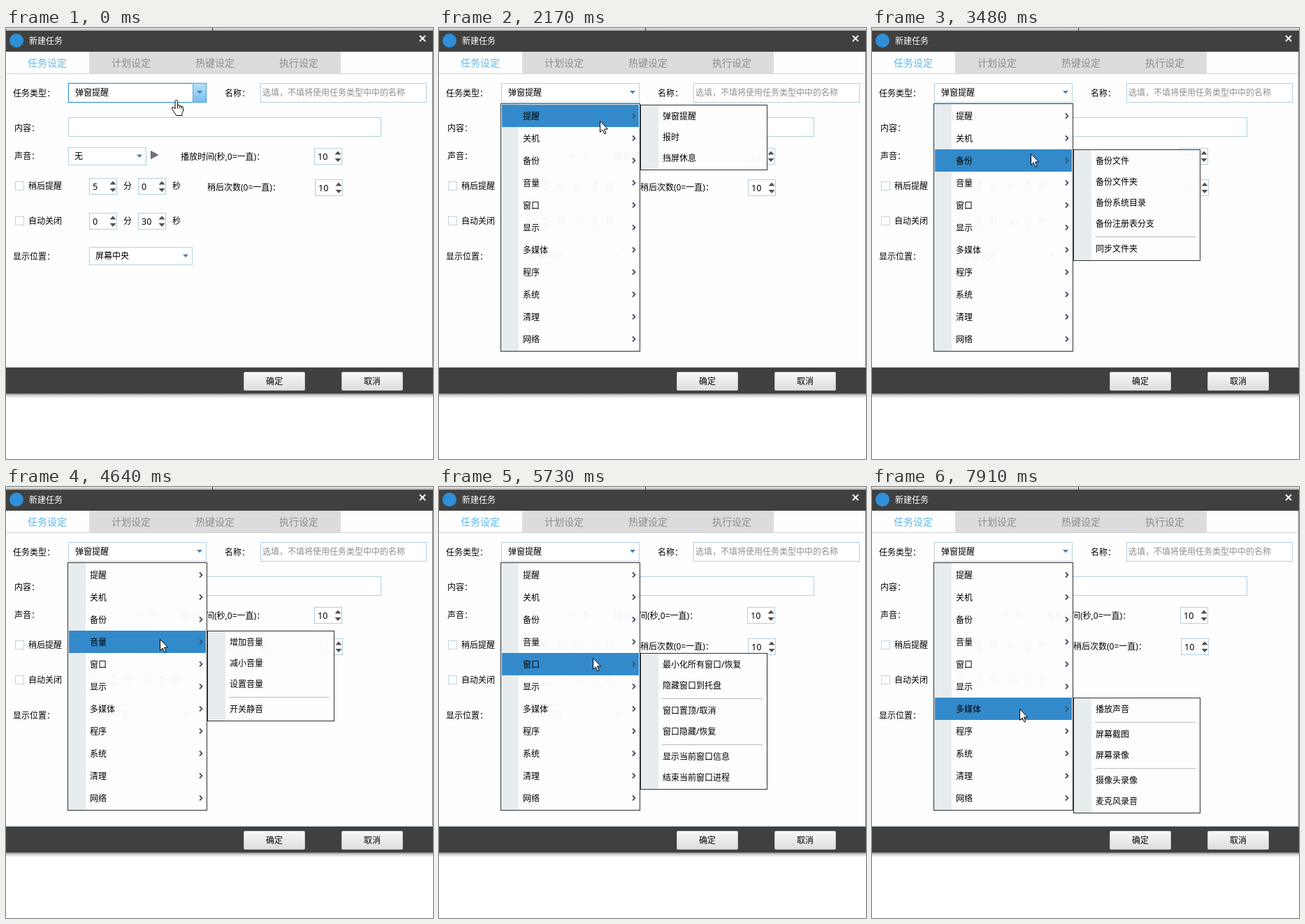
Animation, 611 px wide and 618 px high, one loop 8000 ms. Source, as an HTML page:

```html
<!DOCTYPE html>
<html lang="zh-CN">
<head>
<meta charset="utf-8">
<title>新建任务</title>
<style>
  html, body { margin: 0; width: 100%; height: 100%; overflow: hidden; background: #fff; }
  svg { display: block; font: 12px "Noto Sans", "Noto Sans CJK SC", sans-serif; }
</style>
</head>
<body>
<svg id="stage" width="611" height="618" viewBox="0 0 611 618">
  <defs>
    <linearGradient id="top" x2="0" y2="1"><stop stop-color="#f2f2f2"/><stop offset="1" stop-color="#a0a0a0"/></linearGradient>
    <linearGradient id="shadow" x2="0" y2="1"><stop stop-color="#808080"/><stop offset=".4" stop-color="#d4d4d4"/><stop offset="1" stop-color="#fff"/></linearGradient>
    <linearGradient id="button" x2="0" y2="1"><stop stop-color="#f8f8f8"/><stop offset="1" stop-color="#dedede"/></linearGradient>
    <linearGradient id="drop" x2="0" y2="1"><stop stop-color="#b9e0f7"/><stop offset="1" stop-color="#76bdea"/></linearGradient>
  </defs>
  <g id="form"></g>
  <g id="combo"></g>
  <g id="menu"></g>
  <g id="cursor"></g>
</svg>
<script>
const LOOP = 8000, OPEN = 850, ENTER = 1080;
const MENU = '提醒 关机 备份 音量 窗口 显示 多媒体 程序 系统 清理 网络'.split(' ');
// '-' marks a separator
const SUBMENUS = [
  '弹窗提醒 报时 挡屏休息',
  '关机 重启 注销 锁定 待机 休眠 关闭程序',
  '备份文件 备份文件夹 备份系统目录 备份注册表分支 - 同步文件夹',
  '增加音量 减小音量 设置音量 - 开关静音',
  '最小化所有窗口/恢复 隐藏窗口到托盘 - 窗口置顶/取消 窗口隐藏/恢复 - 显示当前窗口信息 结束当前窗口进程',
  '激活显示器 关闭显示器 - 激活屏保 关闭屏保',
  '播放声音 - 屏幕截图 屏幕录像 - 摄像头录像 麦克风录音'
].map(s => s.split(' '));

// pointer moves: start, end, steps, final x and y, row entered
const MOVES = [
  [380, 450, 2, 238, 97],
  [ENTER, 1230, 3, 231, 120, 0],
  [2170, 2320, 3, 229, 144, 1],
  [3250, 3480, 4, 227, 180, 2],
  [4340, 4410, 2, 225, 193],
  [4640, 4640, 1, 220, 218, 3],
  [5270, 5350, 2, 220, 223],
  [5570, 5730, 3, 220, 245, 4],
  [6660, 6900, 4, 218, 279, 5],
  [7600, 7600, 1, 218, 281],
  [7750, 7910, 3, 211, 318, 6]
];

function stateAt(t) {
  const s = { x: 237, y: 103, row: -1, sub: -1, open: t >= OPEN, hover: t < ENTER };
  for (const [start, end, steps, x, y, row] of MOVES) {
    if (t < start) break;
    const gap = (end - start) / (steps - 1);
    const done = t >= end ? steps : Math.floor((t - start) / gap) + 1;
    const ease = 1 - (1 - done / steps) ** 2;
    s.x = Math.round(s.x + (x - s.x) * ease);
    s.y = Math.round(s.y + (y - s.y) * ease);
    if (row === undefined) continue;
    if (row === 0 || done >= Math.min(2, steps)) s.row = row;
    if (done >= Math.min(3, steps)) s.sub = row;
  }
  return s;
}

const rect = (x, y, w, h, fill, extra = '') =>
  `<rect x="${x}" y="${y}" width="${w}" height="${h}" fill="${fill}" ${extra}/>`;
const box = (x, y, w, h, stroke = '#b1cfe2', fill = '#fff', extra = '') =>
  rect(x + .5, y + .5, w - 1, h - 1, fill, `stroke="${stroke}" ${extra}`);
const text = (x, mid, s, fill = '#000', size = 12) =>
  `<text x="${x}" y="${mid + size * .38}" fill="${fill}" font-size="${size}">${s}</text>`;
const path = (d, fill, extra = '') => `<path d="${d}" fill="${fill}" ${extra}/>`;
const down = (x, y) => path(`M${x - 4} ${y - 2}h8l-4 4.5z`, '#4582b4');
const combo = (x, y, w, h, s) =>
  box(x, y, w, h) + text(x + 9, y + h / 2 - .5, s) + down(x + w - 10, y + h / 2 - .5);
const spinner = (x, y, n) =>
  box(x, y, 40, 24) + text(x + 5, y + 12, n, '#000', 12.5) +
  path(`M${x + 29.5} ${y + 9.5}h9l-4.5 -5zm0 5.5h9l-4.5 5z`, '#505050');
const button = (x, s) => box(x, 493, 88, 27, '#c4c4c4', 'url(#button)', 'rx="1.5"') + text(x + 32, 506.5, s);

function drawHeader() {
  const tabs = ['任务设定', '计划设定', '热键设定', '执行设定'];
  return rect(0, 0, 611, 4, 'url(#top)') + rect(295, 0, 1, 4, '#333') +
    rect(0, 34, 611, 453, '#fefefe') + rect(0, 4, 611, 30, '#404040') +
    '<circle cx="15" cy="18" r="10" fill="#2f8fd8"/>' + text(33, 18, '新建任务', '#fff') +
    path('M592 11l8 8m0 -8l-8 8', 'none', 'stroke="#fff" stroke-width="2"') +
    rect(119, 34, 360, 32, '#dcdcdc') + rect(0, 65, 611, 1, '#d4d4d4') +
    tabs.map((s, i) => text(31 + 120 * i, 50, s, i ? '#8c8c8c' : '#5fb8ee', 14)).join('');
}

const timer = (y, label, min, sec) =>
  box(13, y - 6.5, 13, 13, '#bfd3df') + text(32, y, label) +
  spinner(119, y - 11.5, min) + text(168, y, '分') +
  spinner(189, y - 11.5, sec) + text(238, y, '秒');

function drawFields() {
  return text(10, 93, '任务类型：') + text(313, 93, '名称：') +
    box(364, 79, 238, 28) + text(367, 92.5, '选填，不填将使用任务类型中中的名称', '#8e8e8e') +
    text(12, 143, '内容：') + box(89, 128, 448, 28) +
    text(12, 183, '声音：') + combo(89, 171, 112, 26, '无') +
    path('M207.5 176.5v11l10 -5.5z', '#777080', 'stroke="#66606e"') +
    text(250, 184.5, '播放时间(秒,0=一直)：') + spinner(441, 172, 10) +
    timer(226.5, '稍后提醒', 5, 0) + timer(276.5, '自动关闭', 0, 30) +
    text(288, 228.5, '稍后次数(0=一直)：') + spinner(442, 217, 10) +
    text(10, 327.5, '显示位置：') + combo(119, 314, 148, 26, '屏幕中央');
}

function drawFooter() {
  return rect(610, 34, 1, 453, '#777') +
    rect(0, 486, 611, 1, '#b5cad8') + rect(0, 487, 611, 37, '#404040') +
    button(340, '确定') + button(480, '取消') + rect(0, 524, 611, 7, 'url(#shadow)');
}

function drawCombo(hover) {
  const label = text(99, 92.5, '弹窗提醒'), arrow = down(277, 92);
  if (!hover) return box(89, 79, 198, 28) + label + arrow;
  return box(88, 78, 200, 30, '#cfe6f5') + box(89, 79, 198, 28, '#3a94d0') + label +
    box(267, 79, 20, 28, '#5aa9da', 'url(#drop)') + arrow;
}

const panel = (x, y, w, h, alpha) =>
  box(x, y, w, h, '#303030', '#fdfdfd', `fill-opacity="${alpha}"`) +
  rect(x + 1, y + 1, 25, h - 2, '#e7ecef');

function drawMenu(row, alpha) {
  return panel(88, 108, 200, 356, alpha) + MENU.map((s, i) => {
    const y = 110 + 32 * i;
    return (i === row ? rect(90, y, 196, 32, '#338aca') : '') + text(120, y + 16, s) +
      path(`M277 ${y + 12.5}l3.5 3.5l-3.5 3.5`, 'none', 'stroke="#40506c" stroke-width="1.8"');
  }).join('');
}

function drawSubmenu(index) {
  const top = 110 + 32 * index;
  let y = top + 2, items = '';
  for (const s of SUBMENUS[index]) {
    items += s === '-' ? rect(319, y + 3, 144, 1, '#b9bbbd') : text(320, y + 14.5, s);
    y += s === '-' ? 6 : 30;
  }
  return panel(288, top, 182, y + 2 - top, .97) + items;
}

const ARROW = 'M.5 .5V16.5L4 13L7 19L9 18L6.5 12H11.5Z';
const HAND = 'M5 13V2.5a1.7 2 0 0 1 3.5 0V8q2.5 -1.5 3 .5q2 -1 2.5 1q2.5 -.5 2.5 2V15' +
  'q0 2 -1.7 4.5v3h-8l-6 -9q-1 -3 1.2 -3.2zM8.5 8v4m3 -3.5V12m2.5 -2.5v3';

const [form, comboBox, menu, cursor] = ['form', 'combo', 'menu', 'cursor'].map(id => document.getElementById(id));
form.innerHTML = drawHeader() + drawFields() + drawFooter();

let shown;
function frame() {
  const s = stateAt(performance.now() % LOOP), key = JSON.stringify(s);
  if (key !== shown) {
    shown = key;
    comboBox.innerHTML = drawCombo(s.hover);
    menu.innerHTML = (s.open ? drawMenu(s.row, s.hover ? .92 : .97) : '') + (s.sub < 0 ? '' : drawSubmenu(s.sub));
    cursor.innerHTML = path(s.hover ? HAND : ARROW, '#fff', `stroke="#000" transform="translate(${s.x} ${s.y})"`);
  }
  requestAnimationFrame(frame);
}
frame();
</script>
</body>
</html>
```
